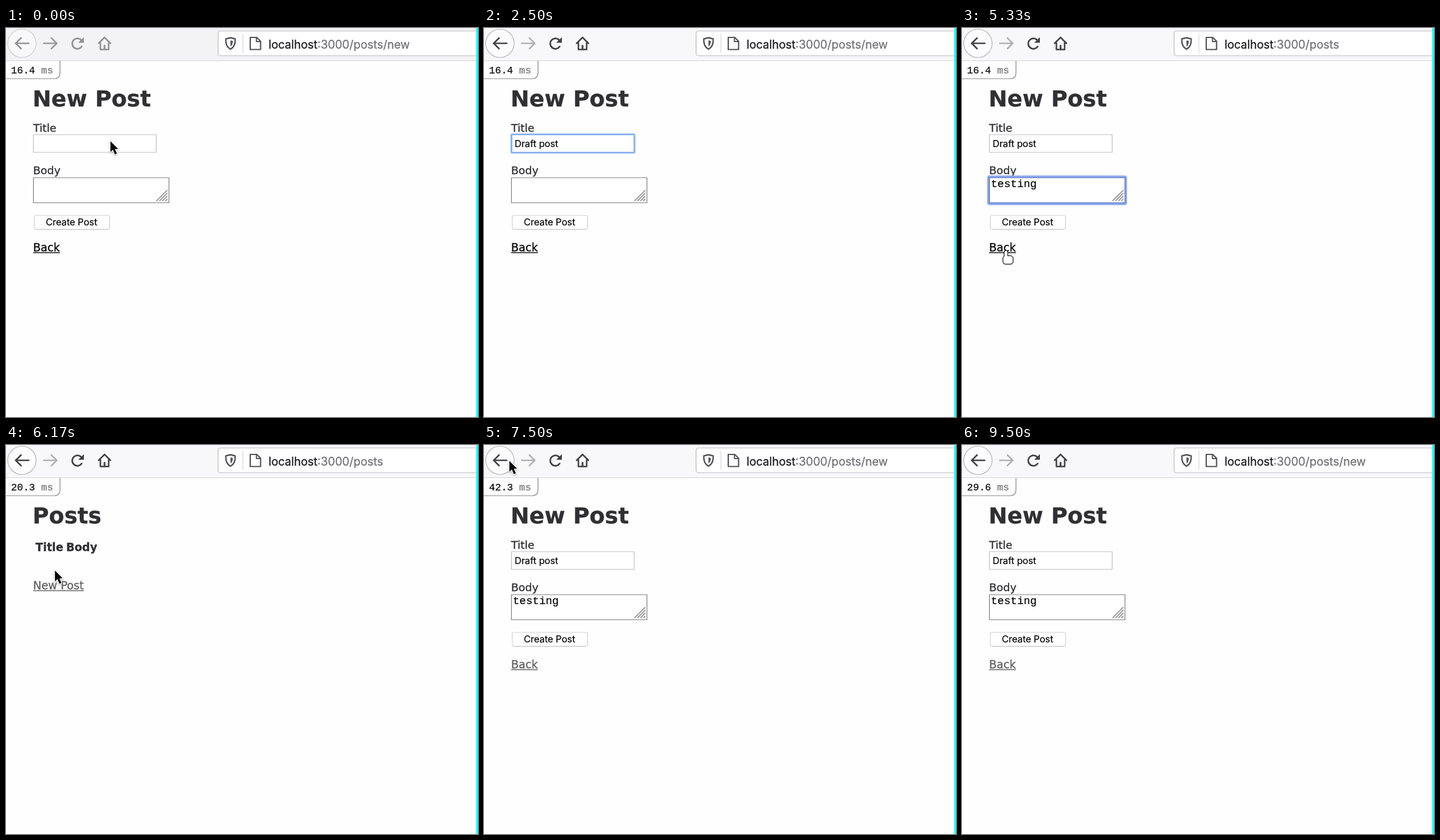
Recreate the animation shown at these times as an HTML page with a canvas. Size 800 px wide and 660 px high, loop 9670 ms.

```html
<!DOCTYPE html>
<html lang="en">
<head>
<meta charset="utf-8">
<title>Draft form</title>
<style>
html, body { margin: 0; width: 100%; height: 100%; overflow: hidden; background: #fff; }
canvas { display: block; }
</style>
</head>
<body>
<canvas id="stage" width="800" height="660"></canvas>
<script>
const ctx = document.getElementById('stage').getContext('2d');
const LOOP = 9670;
const STEP = 1000 / 6;
const SANS = '"DejaVu Sans", sans-serif';
const UI = 'Inter, sans-serif';
const MONO = '"Liberation Mono", monospace';
const INK = '#303034';

const moves = [
  { from: 0, to: 500, x: 132, y: 195, rest: beam },
  { from: 4330, to: 5000, x: 74, y: 378, rest: hand },
  { from: 5500, to: 6170, x: 83, y: 213, rest: arrow },
  { from: 6170, to: 6330, x: 84, y: 234, rest: hand },
  { from: 6670, to: 7500, x: 43, y: 27, rest: arrow },
  { from: 7500, to: 8170, x: 122, y: 25, rest: arrow },
  { from: 9000, to: 9500, x: 800, y: 625, rest: arrow }
];

const within = (t, from, to) => t >= from && t < to;
const ease = u => u * u * (3 - 2 * u);

function typed(str, t, from, to) {
  const u = (t - from + STEP) / (to - from + STEP);
  return t < from ? '' : str.slice(0, Math.ceil(str.length * u));
}

function text(str, x, y, font, color = INK, weight = 0.3) {
  ctx.font = font;
  ctx.fillStyle = color;
  ctx.fillText(str, x, y);
  ctx.strokeStyle = color;
  ctx.lineWidth = weight;
  ctx.strokeText(str, x, y);
}

function trace(points, close) {
  ctx.beginPath();
  points.forEach(([x, y]) => ctx.lineTo(x, y));
  if (close) ctx.closePath();
}

function stroke(color, width) {
  ctx.strokeStyle = color;
  ctx.lineWidth = width;
  ctx.stroke();
}

function fill(color) {
  ctx.fillStyle = color;
  ctx.fill();
}

function line(color, width, ...points) {
  trace(points);
  stroke(color, width);
}

function box(x, y, w, h, color, width = 1, radius = 0) {
  ctx.beginPath();
  ctx.roundRect(x, y, w, h, radius);
  fill('#fff');
  stroke(color, width);
}

function arrowIcon(x, dir, color) {
  line(color, 2.6, [x - 11 * dir, 26], [x + 11 * dir, 26]);
  line(color, 2.6, [x + 2 * dir, 17], [x + 11 * dir, 26], [x + 2 * dir, 35]);
}

function navigation(active) {
  const icon = active ? '#424146' : '#929195';
  ctx.beginPath();
  ctx.arc(27, 26, 24, 0, 7);
  fill(active ? '#fdfdfe' : '#f8f7f9');
  stroke(active ? '#b3b2b6' : '#cfced1', 1.2);
  arrowIcon(27.5, -1, icon);
  arrowIcon(75, 1, active ? '#b1b0b4' : '#9a999d');

  ctx.beginPath();
  ctx.arc(121, 26.5, 8.8, 0.6, 5.6);
  stroke(icon, 2.8);
  trace([[132, 15.5], [132, 25], [122.5, 25]], true);
  fill(icon);

  line(icon, 2.6, [157, 26], [167, 16], [177, 26]);
  line(icon, 2.6, [160, 25], [160, 36.5], [174, 36.5], [174, 25]);
  line(icon, 3, [167, 30], [167, 36]);
}

function shield(color) {
  ctx.beginPath();
  ctx.moveTo(380.5, 16.5);
  ctx.lineTo(388.5, 18.5);
  ctx.bezierCurveTo(389, 28, 386, 33, 380.5, 36);
  ctx.bezierCurveTo(375, 33, 372, 28, 372.5, 18.5);
  ctx.closePath();
  stroke(color, 2.4);
  ctx.beginPath();
  ctx.moveTo(380.5, 21);
  ctx.lineTo(384.5, 22);
  ctx.quadraticCurveTo(384.5, 28.5, 380.5, 31.5);
  fill(color);
}

function toolbar(active, path) {
  ctx.fillStyle = active ? '#f8f7fa' : '#f3f2f4';
  ctx.fillRect(0, 0, 800, 55);
  line('#d2d1d4', 1, [0, 55.5], [800, 55.5]);

  ctx.lineCap = ctx.lineJoin = 'round';
  navigation(active);
  box(359.5, 5, 450, 42, '#b9b8bc', 1.2, 4);
  line('#d8d7da', 1.2, [401.5, 10], [401.5, 42]);
  const dark = '#525156';
  shield(dark);
  trace([[414, 16], [425, 16], [431.5, 22.5], [431.5, 36.5], [414, 36.5]], true);
  stroke(dark, 2.2);
  line(dark, 2, [424.5, 16.5], [424.5, 23], [431, 23]);
  ctx.lineCap = 'butt';
  ctx.lineJoin = 'miter';

  const font = '19.4px ' + UI;
  text('localhost', 445, 34.5, font, '#1c1b20');
  const x = 445 + ctx.measureText('localhost').width;
  text(':3000' + path, x, 34.5, font, '#737277');
}

function badge(value) {
  ctx.beginPath();
  ctx.moveTo(0, 86);
  ctx.lineTo(82, 86);
  ctx.quadraticCurveTo(91.5, 86, 91.5, 76);
  ctx.lineTo(91.5, 56);
  stroke('#858585', 1.2);
  text(value, 8.5, 76.5, '17px ' + MONO, '#111');
  text('ms', 59.5, 76.5, '17px ' + MONO, '#777');
}

function link(str, y, color) {
  text(str, 46, y, '18.7px ' + SANS, color, 0.4);
  const w = ctx.measureText(str).width;
  line(color, 1.5, [46, y + 2.2], [46 + w, y + 2.2]);
}

function caret(x, y) {
  line('#000', 1.5, [x, y], [x, y + 20]);
}

function titleField(t) {
  const focused = within(t, 670, 2670);
  const value = typed('Draft', t, 1330, 1670) + typed(' post', t, 2000, 2330);
  if (focused) box(46.5, 180.5, 208.5, 31, '#8db4f0', 3.2, 1.5);
  else box(46.5, 181, 208, 30, '#bebebe', 1.2);
  text(value, 52, 202, '15.8px ' + UI, '#000', 0.2);
  if (focused && within(t, 830, 2500)) caret(53 + ctx.measureText(value).width, 186);
}

function bodyField(t) {
  const focused = within(t, 2670, 5500);
  const value = typed('testing', t, 3500, 4000);
  if (focused) box(44.7, 252.2, 233, 46.2, '#8caaf0', 4, 2);
  box(46.5, 254, 229.7, 42.5, focused ? '#4664b4' : '#7c7c7c', 1.2);
  for (let i = 0; i < 4; i++) {
    line('#777', 1.2, [255 + i * 5, 293.5], [273.5, 275 + i * 5]);
  }
  text(value, 49, 270, '18.5px ' + MONO, '#000', 0.2);
  const lit = within(t, 2670, 3170) || within(t, 3500, 4330);
  if (lit) caret(50.5 + ctx.measureText(value).width, 255);
}

function form(t) {
  const label = '18.4px ' + SANS;
  text('New Post', 45, 133, 'bold 38px ' + SANS);
  text('Title', 46, 176, label);
  text('Body', 46, 248, label);
  titleField(t);
  bodyField(t);
  box(48, 318, 127.5, 23.5, '#d0d0d0', 1.2, 3);
  line('#bdbdbd', 1, [51, 341.7], [173, 341.7]);
  text('Create Post', 67.5, 334.5, '15.8px ' + UI, '#000', 0.2);
  link('Back', 379, t < 5500 ? '#111' : '#666');
}

function list() {
  const head = 'bold 18.7px ' + SANS;
  text('Posts', 45, 133, 'bold 37.8px ' + SANS);
  text('Title', 50, 180, head);
  text('Body', 102, 180, head);
  link('New Post', 245, '#666');
}

function beam() {
  for (const [color, w] of [['#fff', 3.5], ['#111', 1.7]]) {
    for (const s of [-1, 1]) {
      line(color, w, [-4.5, 11 * s], [-2, 11 * s], [0, 9 * s], [2, 11 * s], [4.5, 11 * s]);
    }
    line(color, w, [0, -9], [0, 9]);
    line(color, w, [-3, 3.5], [3, 3.5]);
  }
}

function arrow() {
  trace([[0, 0], [0, 18.5], [4.2, 14.6], [7.6, 22.6], [11, 21], [7.6, 13.4], [13, 13]], true);
  ctx.shadowColor = 'rgba(0,0,0,.35)';
  ctx.shadowBlur = 3;
  ctx.shadowOffsetY = 1;
  stroke('#fff', 2.6);
  ctx.shadowColor = 'transparent';
  fill('#050505');
}

function hand() {
  ctx.beginPath();
  ctx.roundRect(-2, 0, 5, 15, 2.5);
  ctx.roundRect(-4, 9, 16, 13, 4);
  stroke('#111', 2.4);
  fill('#fff');
}

function pointer(t) {
  if (within(t, 1330, 4500) || t >= 9500) return;
  let x = 177, y = 192, shape = arrow;
  for (const m of moves) {
    if (t < m.from) break;
    const u = ease(Math.min(1, (t - m.from) / (m.to - m.from)));
    x += (m.x - x) * u;
    y += (m.y - y) * u;
    shape = u < 1 ? arrow : m.rest;
  }
  ctx.save();
  ctx.translate(x, y);
  ctx.lineJoin = 'round';
  shape();
  ctx.restore();
}

function draw(t) {
  const onList = within(t, 5500, 6670);
  ctx.fillStyle = '#fefefe';
  ctx.fillRect(0, 0, 800, 660);
  toolbar(t >= 500, within(t, 5330, 6670) ? '/posts' : '/posts/new');
  badge(t < 5500 ? '16.4' : onList ? '20.3' : t < 8330 ? '42.3' : '29.6');
  if (onList) list();
  else form(t);
  ctx.fillStyle = '#00ffff';
  ctx.fillRect(797, 0, 3, 660);
  pointer(t);
}

function snap(ms) {
  return Math.round(Math.floor(ms / STEP + 0.021) * STEP / 10) * 10;
}

const start = performance.now();
function tick() {
  draw(snap((performance.now() - start) % LOOP));
  requestAnimationFrame(tick);
}
tick();
</script>
</body>
</html>
```
